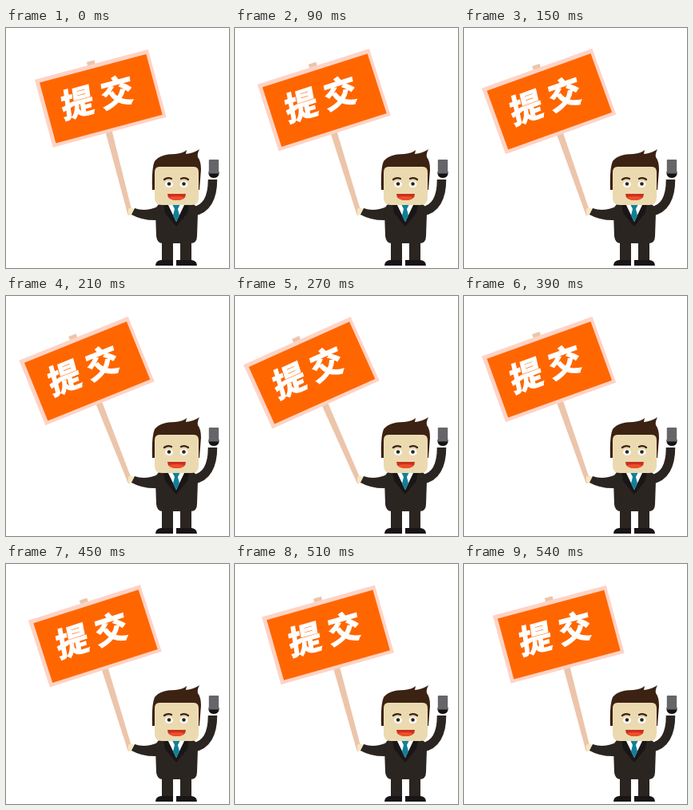
Animation, 279 px wide and 301 px high, one loop 570 ms. Source, as an HTML page:

```html
<!DOCTYPE html>
<html lang="zh">
<head>
<meta charset="utf-8">
<style>
html, body { margin: 0; width: 100%; height: 100%; overflow: hidden; background: #fff; }
svg { display: block; width: 100vw; height: 100vh; }
text { font: 900 41px "Noto Sans CJK SC", "Noto Sans CJK", sans-serif; }
</style>
</head>
<body>
<svg viewBox="0 0 279 301">
  <g id="sign">
    <path d="M-4-198H6L2.300 1h-6z" fill="#ecc5ab"/>
    <rect x="-72.500" y="-193.500" width="147" height="88" fill="#ffd3c5"/>
    <rect x="-67.500" y="-188.300" width="138" height="78.500" fill="#ff6600"/>
    <g transform="translate(0 -150) skewX(-7)" fill="#fff" stroke="#fff" stroke-width="1.400" text-anchor="middle">
      <text x="-28.500" y="13.400">提</text>
      <text x="22.500" y="13.400">交</text>
    </g>
  </g>

  <!-- arms -->
  <path d="M153 227q4-3 7 0l-2 8-5-1z" fill="#f6e6c0"/>
  <path d="M161 226q13 5 29-2v17q-19 1-33-7z" fill="#2b2521"/>
  <path d="M234 230C251 228 258.500 212 258.500 190" fill="none" stroke="#2b2521" stroke-width="11.500"/>
  <path d="M253.500 180h13v3q-1 5-6.500 5t-6.500-5z" fill="#151313"/>
  <rect x="253.800" y="165" width="12.400" height="17.500" rx="1" fill="#66666a"/>

  <!-- legs and suit -->
  <path d="M195 264h14v28h-14zM218 264h14v28h-14z" fill="#2b2521"/>
  <path d="M187 298q0-6 7-7h15v7zM213 298v-7h19q7 1 7 7z" fill="#191516"/>
  <path d="M193 220h40q7 3 7 12l-1 29q0 9-8 9h-35q-7 0-8-9l-1-30q0-8 6-11z" fill="#2b2521"/>
  <path d="M197 220h32l-2 12-14 17-14-17z" fill="#191617"/>
  <path d="M202 220h22l-11 23z" fill="#fff"/>
  <path d="M208.500 222h9l-2.500 5 2 8-4 8-4-8 2-8z" fill="#0f8199"/>

  <!-- head -->
  <path d="M183 203q-1-27 3-36 7-9 26-9 10-1 14-5l-1 5q10-1 17-6-3 6-2 10 4 5 4 16l-2 25z" fill="#3b2213"/>
  <path d="M192 174h43q6 0 6 7v32q0 9-9 9h-37q-9 0-9-9v-32q0-7 6-7z" fill="#ebdab0"/>
  <g fill="none" stroke="#3b2213" stroke-width="2.200" stroke-linecap="round">
    <path d="M198 190q4-3 9-1M219 189q5-2 9 1"/>
  </g>
  <g fill="#fff"><ellipse cx="204" cy="196" rx="5" ry="4"/><ellipse cx="222.500" cy="196" rx="5" ry="4"/></g>
  <g fill="#2b2521"><circle cx="204" cy="195.500" r="2.300"/><circle cx="222.500" cy="195.500" r="2.300"/></g>
  <path d="M202 208h23q0 8-11.500 8T202 208z" fill="#c9301c"/>
  <path d="M204 212q9.500-2 19 0-2 4-9.500 4t-9.500-4z" fill="#ee4e2c"/>
</svg>
<script>
const STEP = 30, COUNT = 19, TURN = 9;
const sign = document.getElementById("sign");

function draw(now) {
  const step = Math.floor(now / STEP) % COUNT;
  const swing = 1 - Math.abs(step - TURN) / TURN;
  const angle = 15 + 9.2 * Math.pow(swing, 1.1);
  sign.setAttribute("transform", `translate(156 233) rotate(${-angle})`);
  requestAnimationFrame(draw);
}
draw(performance.now());
</script>
</body>
</html>
```
